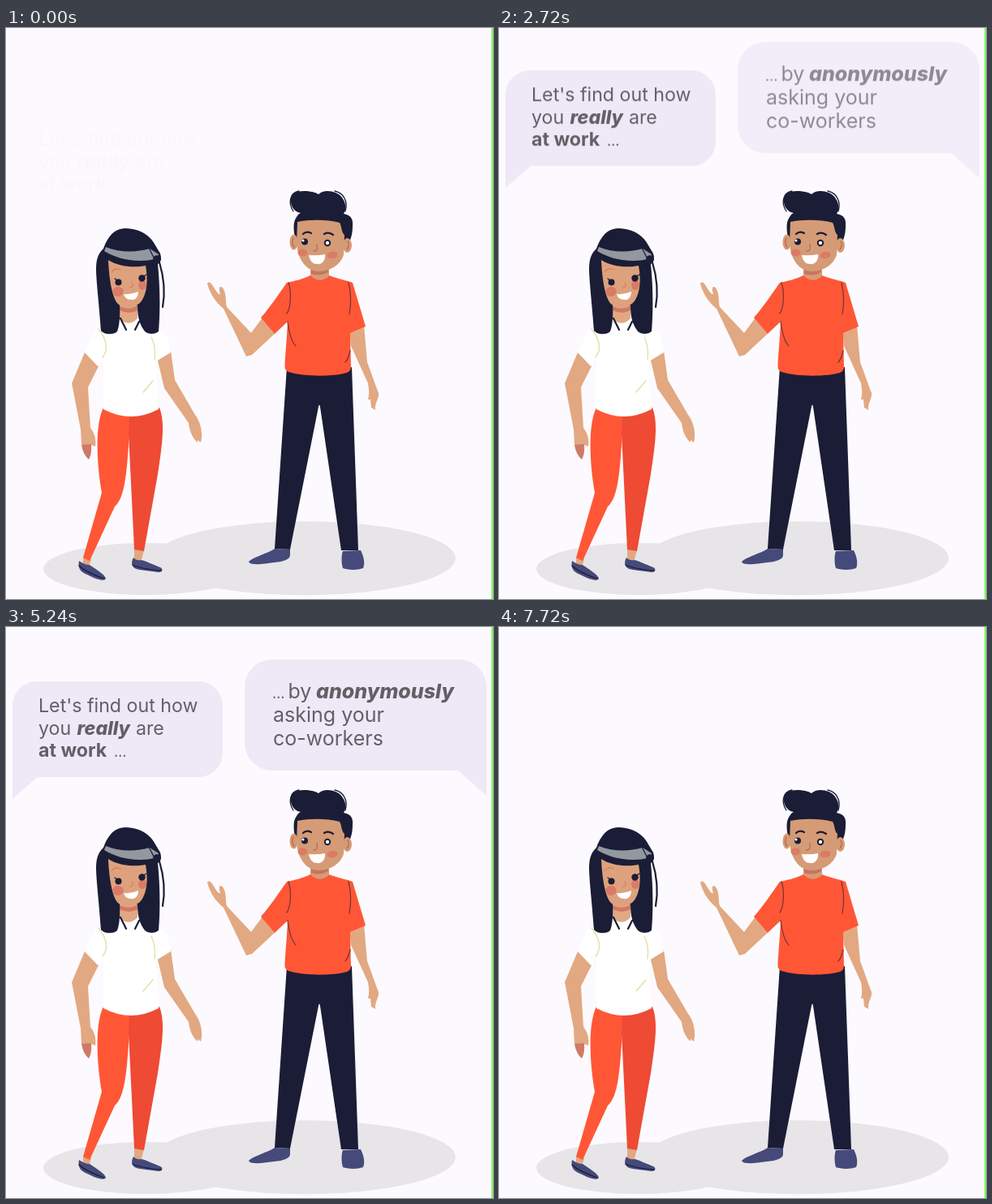
An HTML page for the animation above (8240 ms loop, 600 by 704 pixels).

```html
<!DOCTYPE html>
<html lang="en">
<head>
<meta charset="utf-8">
<title>Team conversation</title>
<style>
  html, body { margin: 0; width: 100%; height: 100%; overflow: hidden; background: #fcfafe; }
  svg { display: block; width: 100%; height: 100%; }
  text { font-family: Inter, "Open Sans", sans-serif; fill: #625f66; }
  .strong { font-weight: 700; }
  .accent { font-weight: 800; font-style: italic; }
  .dots { font-size: 17px; font-weight: 500; }
  .bubble path { fill: #efe8f6; }
  .left { font-size: 23.2px; }
  .right { font-size: 25px; }

  .skin { fill: #e2a882; }
  .face { fill: #dda27d; }
  .tan { fill: #d59b76; }
  .navy { fill: #1b1d36; }
  .red { fill: #ff5736; }
  .blush { fill: #da7b66; }
  .shoe { fill: #454a7b; }
  .white { fill: #fff; }
  .line { fill: none; stroke-width: 1.3; stroke-linecap: round; }
  .thick { stroke-width: 2.2; }
  .ink { stroke: #1b1d36; }
  .seam { stroke: #7c3536; }
  .stitch { stroke: #dfe0a4; }

  .bubble {
    animation-duration: 8240ms;
    animation-iteration-count: infinite;
    animation-timing-function: linear;
  }
  .left { animation-name: left-move, left-fade; }
  .right { animation-name: right-move, right-fade; }

  @keyframes left-move {
    0% { transform: translateY(107px); animation-timing-function: cubic-bezier(.333, .667, .667, 1); }
    18.2% { transform: translateY(58px); animation-timing-function: cubic-bezier(.364, 0, .636, 1); }
    28.52% { transform: translateY(47px); animation-timing-function: cubic-bezier(.364, 0, .636, 1); }
    41.75%, 100% { transform: translateY(67px); }
  }
  @keyframes left-fade {
    0% { opacity: .02; }
    15.17%, 82% { opacity: 1; }
    92.7%, 100% { opacity: 0; }
  }
  @keyframes right-move {
    0%, 22.09% { transform: translateY(59px); animation-timing-function: cubic-bezier(.333, .667, .667, 1); }
    40.53% { transform: translateY(9px); }
    42.48% { transform: translateY(9px); animation-timing-function: cubic-bezier(.364, 0, .636, 1); }
    56.43% { transform: translateY(40px); }
    64.32% { transform: translateY(40px); animation-timing-function: cubic-bezier(.364, 0, .636, 1); }
    82.52%, 100% { transform: translateY(9px); }
  }
  @keyframes right-fade {
    0%, 22.09% { opacity: 0; }
    37.26%, 82.2% { opacity: 1; }
    93.3%, 100% { opacity: 0; }
  }
</style>
</head>
<body>
<svg viewBox="0 0 600 704" preserveAspectRatio="none">
  <rect width="600" height="704" fill="#fcfafe"/>
  <g fill="#e7e5e8">
    <ellipse cx="172" cy="667" rx="126" ry="32"/>
    <ellipse cx="368" cy="653.7" rx="186" ry="45.5"/>
  </g>

  <g id="woman">
    <path class="skin" d="M97 400L81 438 92 495 93 514 105 514 110 516Q112 503 104 493L101 443 114 417Z"/>
    <path fill="#cf7a68" d="M93 514L105 513Q106 525 102 532Q95 526 93 514Z"/>
    <path class="skin" d="M186 406L203 398 208 434 233 477C240 486 243 500 240 511L236 508 236 511C229 505 226 496 225 487L195 444Z"/>
    <path class="skin" d="M95 652L105 655 102 665 95 662ZM158 642L170 644 166 659 158 657Z"/>
    <path class="red" d="M120 468Q136 477 152 478L152 500C149 540 148 578 134 590L103 657 95 653 118 573C112 540 109 490 120 468Z"/>
    <path fill="#ee4a34" d="M152 478Q175 478 189 468C196 486 193 510 187 550L170 645 158 643 151 500Z"/>
    <path class="shoe" d="M90 657C88 666 92 671 100 674C110 679 120 683 123 679C122 674 112 668 103 662Q97 662 90 657Z"/>
    <path class="shoe" d="M157 653C153 660 155 667 165 668L188 671C193 671 194 667 190 665C180 661 172 657 167 656Q161 657 157 653Z"/>
    <path class="line ink" d="M90 663Q98 671 121 679M156 662Q166 667 191 669"/>
    <path class="white" d="M138 359C128 367 118 370 110 372L97 400 113 417 120 406 120 470Q154 488 188 470L185 411 203 400 199 380 190 372 165 358Z"/>
    <path class="line stitch" d="M114 371C124 384 127 396 119 406M179 381Q185 393 183 409M181 435L169 449"/>
    <path class="skin" d="M140 338H162V358Q152 369 140 359Z"/>
    <path fill="#cf7a66" d="M140 343Q152 349 162 342V348Q152 354 140 348Z"/>
    <path class="navy" d="M147 247C165 247 178 256 184 268L190 278C192 284 191 289 187 291C190 320 190 350 188 374C184 378 175 378 171 374C165 366 162 358 162 342L140 340C141 358 139 370 137 374C133 379 120 378 117 373C115 345 111 310 111 297C111 284 114 278 120 272C125 258 133 247 147 247Z"/>
    <path class="line ink thick" d="M189 289C196 312 196 328 193 344M141 358L148 372M164 362L159 372"/>
    <path class="face" d="M126 286C138 294 157 296 172 293C175 310 174 325 168 335C162 345 148 348 139 341C131 335 127 310 126 286Z"/>
    <path fill="#9297a0" d="M123 270C140 277 160 277 177 272L188 279C188 284 180 287 165 287C148 287 132 282 121 275Z"/>
    <path class="line ink" d="M176 271L183 285"/>
    <circle class="navy" cx="186" cy="285" r="4.8"/>
    <ellipse class="blush" cx="138" cy="325" rx="6.8" ry="6"/>
    <ellipse class="blush" cx="168" cy="317" rx="5" ry="6"/>
    <g class="navy">
      <circle cx="138.5" cy="313.5" r="4"/>
      <circle cx="167.5" cy="308.5" r="4.2"/>
    </g>
    <path class="line ink" d="M134 309L137 311M170 306L173 304"/>
    <path class="line" stroke="#d9825c" d="M130 301Q134 295 141 298M155 314Q158 319 153 320"/>
    <path class="white" d="M145 328Q154 329 163 325C163 332 159 336 154 335C149 335 146 332 145 328Z"/>
  </g>

  <g id="man">
    <path class="skin" d="M316 357L332 376 303 403 296 405 268 346C260 340 252 330 248 315C252 309 256 322 262 328L264 328C261 320 264 316 268 322C272 330 270 337 272 344L302 376Z"/>
    <path class="skin" d="M423 374L441 366 445 412C450 425 455 440 459 450C460 457 454 462 455 471L450 468 449 458 446 458C448 450 447 445 446 438L425 392Z"/>
    <path class="navy" d="M346 418Q385 434 426 418L434 644 413 644 387 467Q386 462 385 467L350 643 331 642Z"/>
    <path class="shoe" d="M331 642C322 648 305 652 299 658C301 663 315 661 330 659C342 658 350 655 350 650V643ZM415 645L437 644C442 654 442 662 440 666C432 669 420 668 415 666C413 660 413 650 415 645Z"/>
    <path class="red" d="M375 305C365 310 355 312 346 314C338 325 325 345 314 357L331 377 347 362C346 385 344 402 343.5 416Q343 422 348 424C365 430 405 430 420 425Q425 423 425 418L424 376 443 368 427 314C420 311 410 310 398 305Z"/>
    <path class="line seam" d="M348 314C352 325 351 345 346 352M422 314C426 330 425 342 423 353M347 362Q350 385 357 392M424 398Q422 408 418 412"/>
    <path class="tan" d="M375 290H398V306Q386 316 375 305Z"/>
    <path fill="#c9745d" d="M376 298Q386 302 397 297V301Q387 307 376 303Z"/>
    <path class="navy" d="M358 268C355 255 352 241 358 233Q360 229 363 228C350 226 348 209 354 204C362 199 379 201 385 205C392 198 408 201 414 209C420 217 419 225 416 229C424 231 428 234 427 244C427 256 424 262 421 268Z"/>
    <path class="line ink" d="M354 226C347 215 350 203 361 201M405 201C415 203 422 213 418 226"/>
    <g class="tan">
      <ellipse cx="354.5" cy="264" rx="5" ry="9.5"/>
      <ellipse cx="420.5" cy="268" rx="5.5" ry="9"/>
      <path d="M359 239C375 236 395 236 411 240C414 245 413 252 417 255L416 280C412 292 400 300 385 300C370 300 359 285 358 265Z"/>
    </g>
    <path class="line" stroke="#bc654f" d="M354 259Q351 265 355 270M421 263Q424 268 420 273M383 267Q385 275 379 275"/>
    <ellipse class="blush" cx="365.5" cy="277" rx="6" ry="4.5"/>
    <ellipse class="blush" cx="402" cy="280" rx="6.5" ry="4.2" transform="rotate(-10 402 280)"/>
    <g class="navy">
      <circle cx="368" cy="263.5" r="4"/>
      <circle cx="396" cy="265" r="4.2"/>
    </g>
    <circle class="white" cx="366" cy="262" r="1.6"/>
    <circle class="white" cx="396" cy="265" r="2.2"/>
    <path class="line ink thick" d="M366 254Q370 250 376 253M392 254Q397 251 403 255"/>
    <path class="white" d="M373 280Q384 281 393 279C394 287 389 292 383 291C377 291 374 286 373 280Z"/>
  </g>

  <g class="bubble left">
    <path d="M38 0H237A30 30 0 0 1 267 30V88A30 30 0 0 1 237 118H39L8 145V30A30 30 0 0 1 38 0Z"/>
    <text x="40" y="38">Let's find out how</text>
    <text y="65.5"><tspan x="40">you</tspan><tspan x="87.5" class="accent">really</tspan><tspan x="160">are</tspan></text>
    <text y="93"><tspan x="40" class="strong">at work</tspan><tspan x="133" class="dots">…</tspan></text>
  </g>

  <g class="bubble right">
    <path d="M328 0H558A34 34 0 0 1 592 34V168L557 137H328A34 34 0 0 1 294 103V34A34 34 0 0 1 328 0Z"/>
    <text y="48"><tspan x="328" class="dots">…</tspan><tspan x="347.5">by</tspan><tspan x="382" class="accent">anonymously</tspan></text>
    <text x="329" y="77">asking your</text>
    <text x="329" y="106">co-workers</text>
  </g>

  <rect x="598" width="2" height="704" fill="#80fa5c"/>
</svg>
</body>
</html>
```
